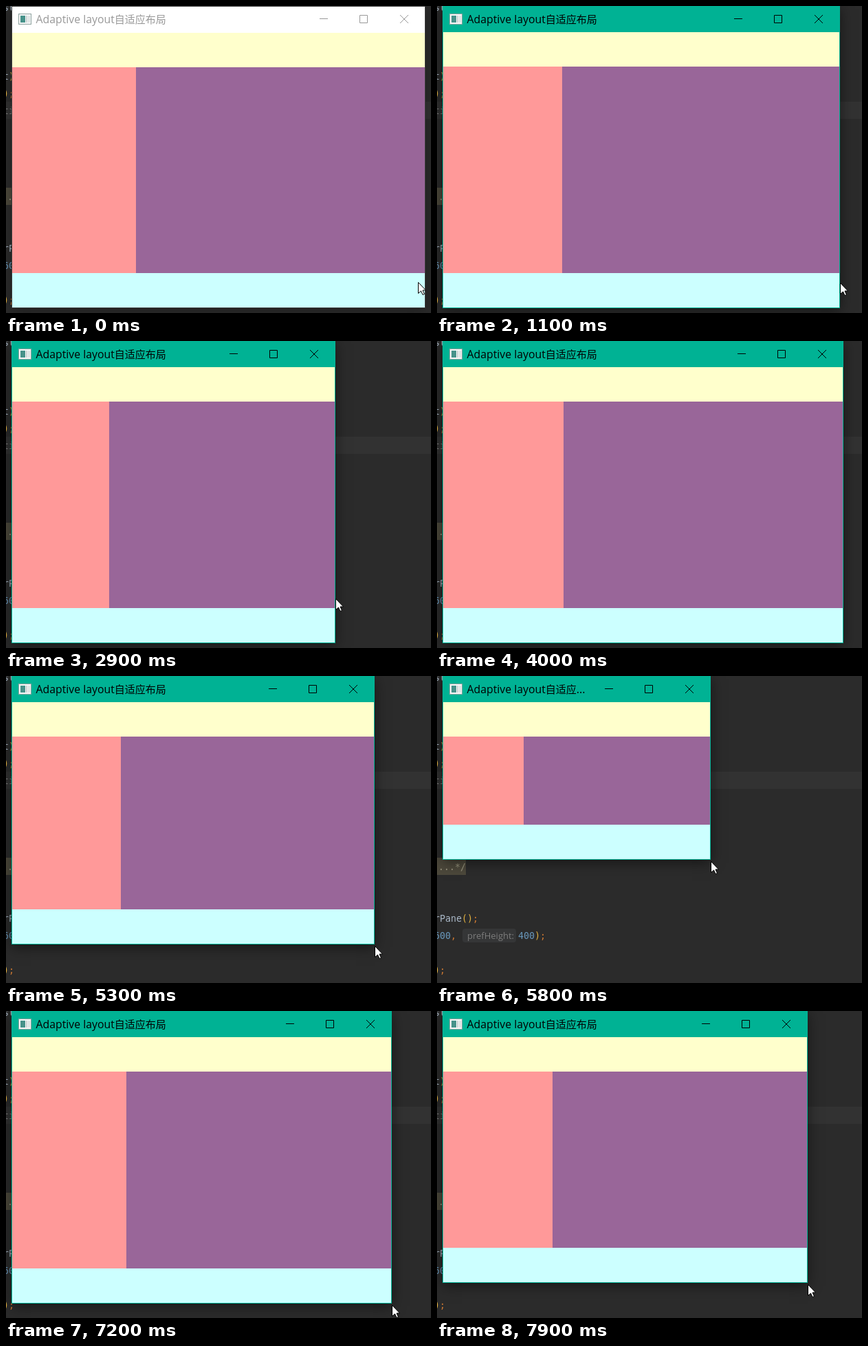
These frames come from a looping animation (618 px wide and 446 px high, 8000 ms). An HTML page with a canvas:

```html
<!DOCTYPE html>
<html lang="en">
<head>
<meta charset="utf-8">
<title>Adaptive layout</title>
<style>
html, body { margin: 0; width: 100%; height: 100%; overflow: hidden; background: #2b2b2b; }
canvas { display: block; }
</style>
</head>
<body>
<canvas id="stage" width="618" height="446"></canvas>
<script>
const ctx = document.getElementById('stage').getContext('2d');
const LOOP = 8000, STEP = 100;
const LEFT = 9, RIGHT = 609, BOTTOM = 438, BAR = 50, TEAL = '#00b294';
const CHAR = 8, LINE = 25;
const MONO = '13.3px "DejaVu Sans Mono", monospace';
const LATIN = '15.8px "Open Sans", sans-serif';
const HAN = '15px "Noto Sans CJK SC", "Noto Sans CJK", sans-serif';
const ARROW = new Path2D('M0 0V16L4 12.5L6.5 18L9 17L6.5 11.5H11Z');

const linear = p => p;
const easeOut = p => 1 - (1 - p) ** 2;
const easeIn = p => p ** 2.8;
const move = (start, end, right, bottom = BOTTOM, ease = linear) => ({ start, end, right, bottom, ease });

// Each drag takes the window's right and bottom edges to a new place.
const DRAGS = [
  move(1000, 1400, 512),
  move(1600, 2100, 588, BOTTOM, easeOut),
  move(2100, 2500, 255),
  move(2600, 3300, 586, BOTTOM, easeOut),
  move(3300, 3500, 566),
  move(3600, 4000, 590),
  move(5100, 5800, 397, 266),
  move(5900, 6800, 540, 417, easeIn),
  move(6800, 7500, 575, 430),
  move(7700, 7900, 538, 394)
];

function windowSize(t) {
  let right = RIGHT, bottom = BOTTOM;
  for (const d of DRAGS) {
    if (t <= d.start) break;
    const p = d.ease(Math.min(1, (t - d.start) / (d.end - d.start)));
    right += (d.right - right) * p;
    bottom += (d.bottom - bottom) * p;
  }
  return [Math.round(right), Math.round(bottom)];
}

function rect(x, y, w, h, color) {
  ctx.fillStyle = color;
  ctx.fillRect(x, y, w, h);
}

function text(s, x, y, color, font) {
  ctx.font = font;
  ctx.fillStyle = color;
  ctx.fillText(s, x, y);
}

function syntaxColor(c) {
  if (/\d/.test(c)) return '#6897bb';
  if (/[()]/.test(c)) return '#e0b040';
  return /[;,]/.test(c) ? '#cc7832' : '#a9b7c6';
}

function code(row, x, s, color) {
  [...s].forEach((c, i) => text(c, x + i * CHAR, 7 + row * LINE, color || syntaxColor(c), MONO));
}

function drawEditor() {
  rect(0, 0, 618, 446, '#2b2b2b');
  rect(0, 139, 618, LINE, '#323232');
  rect(0, 264, 42, LINE, '#4c483b');
  code(0, -4, 'st');
  code(4, -4, 't)');
  code(5, -4, ');');
  code(6, -4, 'ti', '#787878');
  code(11, 2, '...*/', '#98957f');
  code(14, -4, 'rPane();');
  code(15, -4, '600,');
  code(15, 118, '400);');
  code(17, -4, ');');
  code(18, 15, '"', '#8f7a48');
  ctx.fillStyle = '#353637';
  ctx.beginPath();
  ctx.roundRect(37, 367, 78, 20, 4);
  ctx.fill();
  text('prefHeight:', 44, 382, '#7c7c7c', '13px "Open Sans", sans-serif');
}

function drawTitle(right, color) {
  const limit = right - 176, ellipsis = 12;
  const glyphs = [...'Adaptive layout自适应布局'].map(c => {
    const font = ctx.font = c < '\u0100' ? LATIN : HAN;
    return { c, font, w: ctx.measureText(c).width };
  });
  let x = 43.6;
  const cut = x + glyphs.reduce((sum, g) => sum + g.w, 0) > limit;
  for (const { c, font, w } of glyphs) {
    if (cut && x + w + ellipsis > limit) break;
    text(c, x, 25, color, font);
    x += w;
  }
  if (cut) text('...', x, 25, color, LATIN);
}

function drawButtons(right, color) {
  const x = right - 30;
  ctx.strokeStyle = color;
  ctx.lineWidth = 1;
  ctx.beginPath();
  ctx.moveTo(right - 153, 18.5);
  ctx.lineTo(right - 141, 18.5);
  ctx.rect(right - 94.5, 13.5, 11, 11);
  for (const d of [-6, 6]) {
    ctx.moveTo(x - d, 13);
    ctx.lineTo(x + d, 25);
  }
  ctx.stroke();
}

function drawIcon() {
  rect(18, 11, 19, 16, '#8fa3a0');
  rect(19, 12, 17, 14, '#f4f6f6');
  rect(21, 14, 7, 10, '#46928a');
  rect(29, 14, 2, 10, '#c9d2d2');
  rect(32, 14, 3, 10, '#dde3e3');
}

function drawWindow(right, bottom, active) {
  const w = right - LEFT, top = active ? 0 : 1, head = 39 - (active ? 1 : 0);
  const split = LEFT + Math.ceil(w * 0.3), foot = bottom - BAR, body = head + BAR;
  const ink = active ? '#000000' : '#999999';
  ctx.save();
  ctx.shadowColor = active ? 'rgba(0,0,0,.5)' : 'rgba(0,0,0,.3)';
  ctx.shadowBlur = 18;
  ctx.shadowOffsetY = 4;
  rect(LEFT - 1, 0, w + 2, bottom + 1, active ? TEAL : '#3a3a3a');
  ctx.restore();
  rect(LEFT, top, w, head - top, active ? TEAL : '#ffffff');
  rect(LEFT, head, w, BAR, '#ffffcc');
  rect(LEFT, body, split - LEFT, foot - body, '#ff9999');
  rect(split, body, right - split, foot - body, '#996699');
  rect(LEFT, foot, w, BAR, '#ccffff');
  drawIcon();
  drawTitle(right, ink);
  drawButtons(right, ink);
}

function drawPointer(x, y) {
  ctx.save();
  ctx.translate(x + 0.5, y + 0.5);
  ctx.fillStyle = '#ffffff';
  ctx.fill(ARROW);
  ctx.strokeStyle = '#000000';
  ctx.lineWidth = 1;
  ctx.stroke(ARROW);
  ctx.restore();
}

function draw(t) {
  const [right, bottom] = windowSize(t);
  drawEditor();
  drawWindow(right, bottom, t >= 800);
  if (t < 300) drawPointer(599 + t / 50, 401 + t / 10);
  else if (t >= 1100 && t < 4000) drawPointer(right + 1, Math.round(404 - (t - 1000) * 0.016));
  else if (t >= 5200) drawPointer(right + 1, bottom + 3);
}

function tick() {
  draw(Math.floor(performance.now() % LOOP / STEP) * STEP);
  requestAnimationFrame(tick);
}
tick();
</script>
</body>
</html>
```
